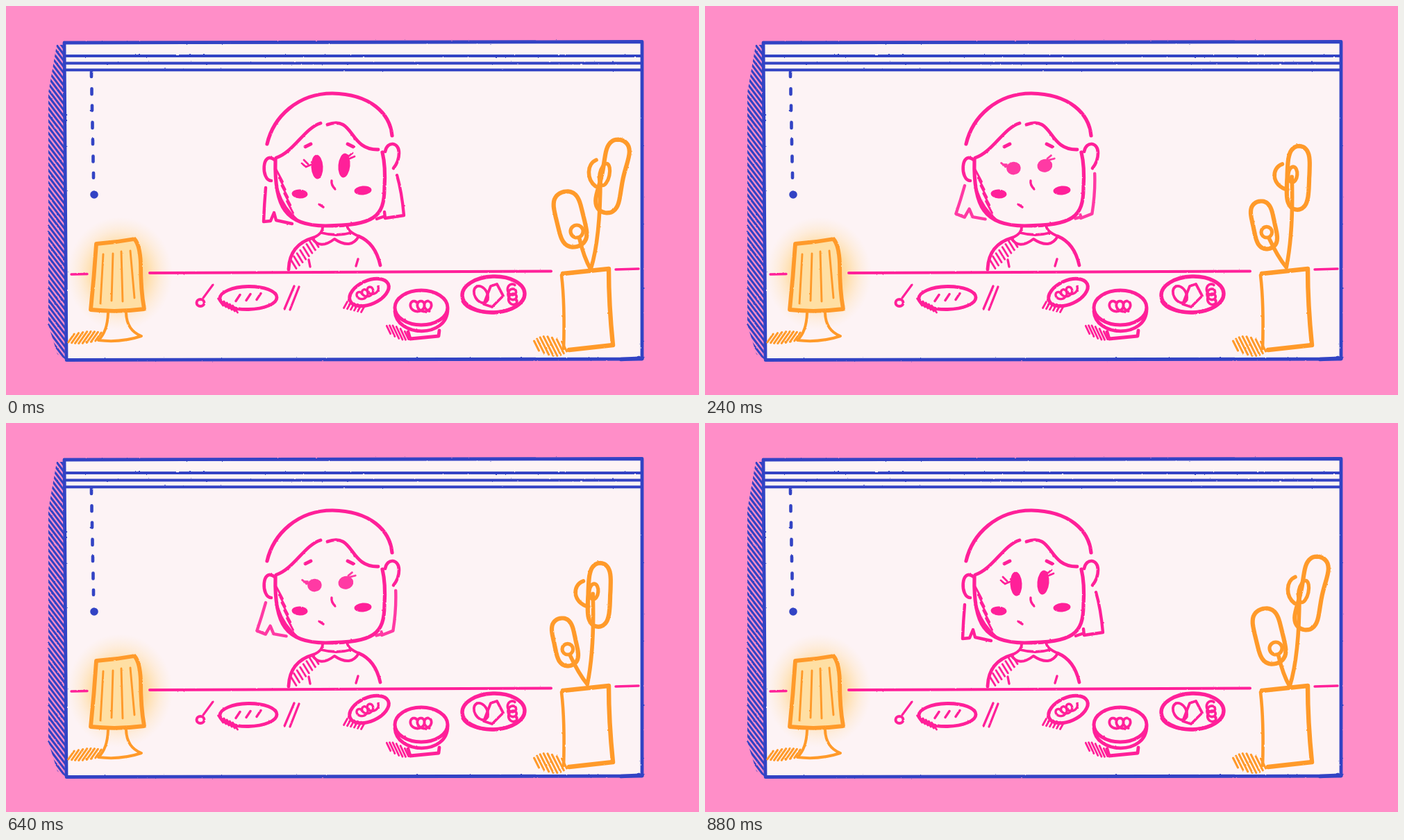
An HTML page for the animation above (0.96 s loop, 998 by 561 pixels).

```html
<!DOCTYPE html>
<html lang="en">
<head>
<meta charset="utf-8">
<title>Dinner by the window</title>
<style>
  html, body { margin: 0; width: 100%; height: 100%; overflow: hidden; background: #ff8ec8; }
  svg { display: block; width: 100%; height: 100%; overflow: hidden; }
  .ink { fill: none; stroke-linecap: round; stroke-linejoin: round; stroke-width: 4.8; filter: url(#rough); }
  .blue { stroke: #3243c4; }
  .pink { stroke: #ff2099; }
  .orange { stroke: #ff9a2a; }
  .solid { fill: #ff2099; stroke: none; }
  /* six poses side by side; the strip steps there and back */
  #strip { animation: sway 480ms steps(6, jump-none) infinite alternate; }
  @keyframes sway { from { transform: translateX(0); } to { transform: translateX(-4990px); } }
</style>
</head>
<body>
<svg viewBox="0 0 998 561">
  <defs>
    <filter id="rough" filterUnits="userSpaceOnUse" x="0" y="0" width="998" height="561" color-interpolation-filters="sRGB">
      <feTurbulence type="fractalNoise" baseFrequency=".22" numOctaves="2" seed="4"/>
      <feDisplacementMap in="SourceGraphic" scale="1.8" xChannelSelector="R" yChannelSelector="G"/>
    </filter>
    <radialGradient id="glow">
      <stop offset="0" stop-color="#ffd07c"/>
      <stop offset=".5" stop-color="#ffd68e" stop-opacity=".8"/>
      <stop offset=".78" stop-color="#ffdfaa" stop-opacity=".32"/>
      <stop offset="1" stop-color="#ffe6c0" stop-opacity="0"/>
    </radialGradient>
    <clipPath id="side"><path d="M73 56H84L88 511L74 502L61 460V125Z"/></clipPath>
  </defs>
  <path d="M83 53L916 51V509L87 511Z" fill="#fdf3f5"/>
  <ellipse cx="164" cy="386" rx="76" ry="82" fill="url(#glow)"/>
  <g id="frame" class="ink blue"></g>
  <g id="scene" class="ink pink"></g>
  <g id="props" class="ink orange"></g>
  <g id="strip"></g>
</svg>
<script>
const $ = id => document.getElementById(id);
const { sin, cos, PI } = Math;

const line = (d, width) => `<path d="${d}"${width ? ` stroke-width="${width}"` : ''}/>`;
const oval = (x, y, rx, ry, turn = 0, attr = '') =>
  `<ellipse cx="${x}" cy="${y}" rx="${rx}" ry="${ry}" transform="rotate(${turn} ${x} ${y})" ${attr}/>`;
const blob = (x, y, rx, ry, turn) => oval(x, y, rx, ry, turn, 'class="solid"');

// path through f(0)..f(1)
function trace(f, width, steps = 60) {
  const pts = Array.from({ length: steps + 1 }, (_, i) => f(i / steps).map(v => v.toFixed(1)));
  return line('M' + pts.join('L'), width);
}

// n parallel strokes centred between two points, longest mid-way when bulge is set
function hatch(x0, y0, x1, y1, n, dx, dy, width, bulge = 0) {
  let d = '';
  for (let i = 0; i < n; i++) {
    const s = i / (n - 1), k = 1 - bulge + bulge * sin(PI * s);
    d += `M${x0 + (x1 - x0) * s - dx * k / 2} ${y0 + (y1 - y0) * s - dy * k / 2}l${dx * k} ${dy * k}`;
  }
  return line(d, width);
}

// a row of n loops of radius r
const scribble = (x0, y0, x1, y1, n, r, width) => trace(s => {
  const a = PI * (2 * n * s + 1.2);
  return [x0 + (x1 - x0) * s - r * cos(a), y0 + (y1 - y0) * s + r * sin(a)];
}, width);

// closed shape from tip to tip, half as wide as r says, narrowed at the waist by pinch
const petal = (x0, y0, x1, y1, r, pinch, width) => trace(s => {
  const a = 2 * PI * s, along = (1 - cos(a)) / 2, dx = x1 - x0, dy = y1 - y0;
  const across = r * sin(a) * (1 - pinch * sin(a) ** 2) / Math.hypot(dx, dy);
  return [x0 + dx * along - dy * across, y0 + dy * along + dx * across];
}, width);

let cord = '';
for (let i = 0; i < 7; i++) cord += `M${123 + i * .5} ${i * 24.3 + 95}v${7 + i % 2}`;

$('frame').innerHTML =
  `<g clip-path="url(#side)">${hatch(74, 40, 74, 530, 56, 32, 42, 3.1)}</g>` +
  line('M84 53L916 51.500V509L87 510.500Z', 4.8) + line('M886 509.500L916 508', 5.5) +
  [72, 82.5, 92.3].map(y => line(`M87 ${y}H914`, 3.9)).join('') +
  line(cord, 4.6) + '<circle cx="127" cy="272" r="3.4" fill="#3243c4"/>';

const head =
  line('M376 199C385 160 420 126 470 126C525 127 553 155 556 187', 5.2) +
  line('M389 219C415 210 430 176 453 169M463 171C502 157 493 208 536 207', 4.8) +
  line('M387 222C368 207 367 252 382 252M546 210C549 194 566 196 566 212Q566 224 558 234', 4.6) +
  line('M388 222C386 290 403 317 460 317C530 317 545 304 545 262Q547 232 542 211', 5.2) +
  line('M392 268Q400 292 420 309', 3.6) +
  hatch(394, 245, 409, 290, 5, 9, 17, 2.8) +
  line('M431 203L439 199M492 199L500 203', 4.8) +
  line('M469 252Q468 258 474 264M451 286L457 290', 3.4) +
  blob(423, 271, 11.5, 6.5, 3) + blob(514, 266, 12.5, 6.5, -5);

const body =
  line('M456 317Q457 328 443 334M491 315Q491 325 508 332M454 327Q476 333 497 327', 3.8) +
  line('M441 335Q452 352 473 336Q497 352 508 332', 4) +
  line('M443 334Q408 344 407 380M508 332Q532 342 539 374') +
  line('M436 366L438 376M507 365L504 375', 3.4) +
  hatch(414, 372, 446, 341, 8, 8, 13, 2.8);

const food =
  oval(280, 428, 5.5, 5, 0, 'stroke-width="4"') + line('M284 421L298 402', 3.2) +
  oval(349, 421, 41, 16.5, -1) + hatch(334, 421, 364, 419, 3, 6, -9, 3.4) +
  hatch(309, 427, 330, 437, 6, 7, 10, 2.8) +
  line('M401 437L415 404M409 438L422 405', 3.3) +
  oval(523, 413, 30, 17, -24, 'stroke-width="5"') + scribble(508, 419, 531, 408, 3, 6, 3.4) +
  hatch(489, 431, 514, 437, 6, -5, 9, 2.8) +
  oval(598, 435, 38, 25, 0, 'stroke-width="5"') + scribble(586, 433, 612, 433, 2.6, 7.5, 3.8) +
  line('M560 440C562 478 636 480 636 437M579 470L582 480L623 476L624 468') +
  hatch(551, 467, 577, 475, 6, 9, 19, 2.8, .4) +
  oval(702, 416, 45, 26, -2, 'stroke-width="5.400"') + line('M658 426C670 448 734 448 746 421') +
  oval(684, 416, 9, 13, -30, 'stroke-width="3.800"') +
  line('M698 404L707 401L716 418L700 434L688 430Z', 3.8) + scribble(728, 406, 730, 427, 3, 6, 3.6);

$('scene').innerHTML =
  line('M94 387L117 386.500M878 380L911 379', 3.4) + line('M207 385L785 382.500', 4) + head + body + food;

$('props').innerHTML =
  '<path d="M130 343Q158 341 185 336Q193 345 194 372Q194 410 199 437Q160 442 122 438Q127 390 130 343Z" fill="#ffdfa3" stroke-width="5.800"/>' +
  line('M140 358L136 429M154 357L152 425M166 354L168 426M179 353L185 421', 2.9) +
  line('M147 443Q146 470 133 482Q165 486 195 476Q174 468 173 443', 4) +
  hatch(94, 479, 133, 477, 8, 12, -17, 3, .3) +
  line('M802 386L868 379Q868 430 874 489L811 496', 6.4) + line('M800 388Q805 430 803 494', 4.6) +
  hatch(764, 490, 804, 491, 8, 14, 28, 3, .5);

// poses run from u = 0 (awake, upright) to u = 1 (eyes shut, blown left)
const strip = $('strip');
for (let i = 0; i < 6; i++) {
  const u = i / 5, swell = sin(PI * u);
  const mix = (from, to) => from.map((v, k) => v + (to[k] - v) * u);
  // path whose start and end poses share the same commands
  const morph = (from, to, width) => {
    const ends = to.match(/\d+/g);
    let k = 0;
    return line(from.replace(/\d+/g, v => mix([+v], [+ends[k++]])[0].toFixed(1)), width);
  };

  const open = Math.max(1.8, 17.5 * (1 - u ** 1.5));
  const eyes =
    blob(448 - 6 * u, 232 - 3 * u + 4 * swell, 8.5 + 3 * u, open, -3) +
    blob(487 + 4 * u, 230 - 6 * u + 4 * swell, 8.5 + 4 * u, open, 5 - 12 * u - 10 * swell) +
    morph('M426 227L432 232M429 222L435 228M432 232L439 229', 'M427 226L433 231M430 233L434 229M433 232L440 230', 2.8) +
    morph('M493 217L499 212M495 220L502 217', 'M493 222L498 218M494 224L504 222', 2.8);

  const locks =
    morph('M374 262Q372 285 371 311L381 310L386 298L389 309L412 314', 'M374 257Q366 275 355 292L369 301L377 289L383 301L398 303', 4.4) +
    morph('M563 244Q570 268 573 302L546 306L545 297M543 304L534 307', 'M560 240Q557 270 547 298L538 306L538 304M538 305L533 306', 4.4);

  const plant =
    petal(...mix([885, 193, 862, 298, 31, .5], [837, 208, 846, 291, 20, .25]), 6.2) +
    petal(...mix([803, 268, 822, 347, 30, .35], [794, 291, 806, 352, 20, .35]), 6.2) +
    oval(...mix([862, 243, 7, 16, 12], [836, 243, 6, 8, 0]), 'stroke-width="5.200"') +
    oval(...mix([822, 325, 9, 9, 0], [800, 327, 7, 7, 0]), 'stroke-width="5.200"') +
    morph('M850 222C836 228 836 250 849 260', 'M819 232C800 238 803 266 832 268', 5.6) +
    morph('M856 248Q856 335 842 380Q832 362 826 336', 'M838 245Q842 320 834 375Q820 362 803 334', 5.6);

  strip.insertAdjacentHTML('beforeend',
    `<g transform="translate(${998 * i})">` +
    `<g class="ink pink" opacity="${i ? .88 : 1}">${eyes}${locks}</g><g class="ink orange">${plant}</g></g>`);
}
</script>
</body>
</html>
```
